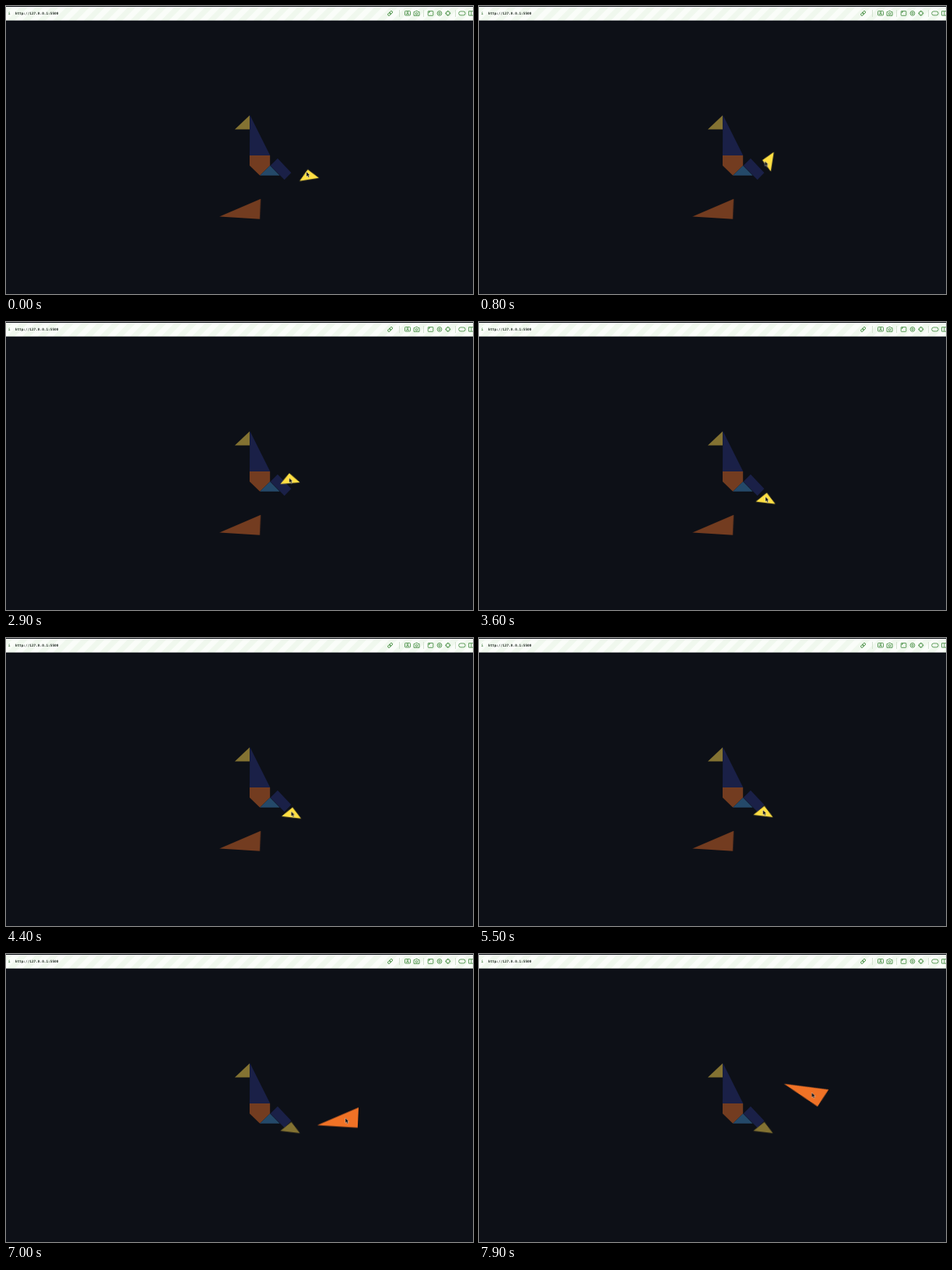
Write an HTML page that moves like this. It is 600 px wide and 370 px high and loops after 8000 ms.

```html
<!DOCTYPE html>
<html lang="en">
<head>
<meta charset="utf-8">
<title>Tangram</title>
<style>
  html, body { margin: 0; width: 100%; height: 100%; overflow: hidden; background: #0d1017; }
  svg { display: block; width: 600px; height: 370px; }
  .navy { fill: #1a2047; }
  .gold { fill: #837232; }
  .rust { fill: #733c20; }
  .blue { fill: #244969; }
  .icons { fill: none; stroke: #4b9148; stroke-width: .9; }
  .url { font: bold 4.4px "DejaVu Sans Mono", monospace; fill: #263029; }

  .tail, .wing, .cursor { animation: 8s linear infinite; }
  .tail { animation-name: tail, tail-fill; }
  .wing { animation-name: wing, wing-fill; }
  .cursor { animation-name: cursor; }

  @keyframes tail {
    0%, 1.25%   { transform: translate(389px, 218.7px) rotate(-9deg); }
    10%         { transform: translate(372.7px, 199.4px) rotate(-81deg); }
    22.5%       { transform: translate(365.5px, 202px) rotate(-86deg); }
    25%, 27.5%  { transform: translate(364.6px, 202.4px) rotate(-86deg); }
    37.5%       { transform: translate(364.7px, 203px) rotate(6.8deg); }
    45%, 50%    { transform: translate(368.7px, 228.1px) rotate(6.8deg); }
    60%, 100%   { transform: translate(365.6px, 224.5px) rotate(6.8deg); }
  }
  @keyframes wing {
    0%, 76.25%  { transform: translate(309.3px, 264px) rotate(0deg); }
    86.25%, 90% { transform: translate(435px, 213.4px) rotate(0deg); }
    94%         { transform: translate(435px, 213.4px) rotate(30.6deg); }
    98.75%, 100% { transform: translate(425.4px, 179px) rotate(30.6deg); }
  }
  /* the piece picked up last is lit */
  @keyframes tail-fill {
    0%, 76.24%    { fill: #ffdf43; }
    76.25%, 100%  { fill: #837232; }
  }
  @keyframes wing-fill {
    0%, 76.24%    { fill: #733c20; }
    76.25%, 100%  { fill: #f07226; }
  }
  @keyframes cursor {
    0%, 1.25%   { transform: translate(386px, 213px); }
    10%         { transform: translate(367.3px, 199.3px); }
    22.5%       { transform: translate(363px, 202px); }
    25%, 27.5%  { transform: translate(362px, 202.3px); }
    37.5%       { transform: translate(364px, 200px); }
    45%, 50%    { transform: translate(368px, 224.5px); }
    60%, 68.75% { transform: translate(364.8px, 220.9px); }
    75%, 76.25% { transform: translate(310.3px, 261.3px); }
    86.25%, 94% { transform: translate(436px, 210.7px); }
    98.75%, 100% { transform: translate(427.5px, 178px); }
  }
</style>
</head>
<body>
<svg viewBox="0 0 600 370">
  <defs>
    <pattern id="stripes" width="14" height="14" patternUnits="userSpaceOnUse" patternTransform="rotate(45)">
      <rect width="14" height="14" fill="#fafdf9"/>
      <rect width="7" height="14" fill="#f0f8ee"/>
    </pattern>
  </defs>
  <rect width="600" height="370" fill="#0d1017"/>

  <rect y="1" width="600" height="17.6" fill="url(#stripes)"/>
  <text class="url" x="2.8" y="11" style="fill:#3c7a3a">i</text>
  <text class="url" x="11.8" y="11">http://127.0.0.1:5500</text>
  <path d="M505.500 5v9M536.500 5v9M577.500 5v9" stroke="#d5e3d2" fill="none"/>
  <g class="icons">
    <g transform="rotate(-45 493.500 9.500)">
      <rect x="490" y="8" width="4.200" height="3" rx="1.500"/>
      <rect x="493" y="8" width="4.200" height="3" rx="1.500"/>
    </g>
    <rect x="512.500" y="6.500" width="7" height="5.500" rx=".8"/>
    <path d="M514 11q2-2.500 4 0" />
    <circle cx="516" cy="8.600" r=".9"/>
    <path d="M524 7.500h1.500l1-1.200h2l1 1.200h1.500v4.800h-7z"/>
    <circle cx="527.500" cy="9.800" r="1.300"/>
    <rect x="542.200" y="6.500" width="6.600" height="5.800" rx=".6"/>
    <path d="M543.500 9v-1.300h1.500"/>
    <circle cx="557" cy="9.400" r="2.900"/>
    <circle cx="557" cy="9.400" r="1.200"/>
    <circle cx="567.800" cy="9.300" r="2.600"/>
    <path d="M567.800 5.800v2M567.800 10.800v2M564.300 9.300h2M569.300 9.300h2"/>
    <path d="M585 6.900h-.8a2.500 2.500 0 0 0 0 5h.8M586.800 6.900h.8a2.500 2.500 0 0 1 0 5h-.8M585 6.900l1.800 0M585 11.900h1.800"/>
    <path d="M601 6.700h-6.400v5.400h6.400M597.800 6.700v5.400"/>
  </g>

  <path class="gold" d="M313 140.500V158.500H294z"/>
  <path class="navy" d="M313.300 140L339.300 192H313z"/>
  <path class="rust" d="M313 192H339.200V205L326.200 217.700L313 205z"/>
  <path class="blue" d="M339.200 205L351.700 217.700H326.200z"/>
  <path class="navy" d="M349 195.700L366.500 214.200L357.700 223.300L339.700 205z"/>
  <path class="tail" d="M-12.600 4.300L12.600 4.300L0 -8.700z"/>
  <path class="wing" d="M-35 6.500L18 -16.300L16.800 9.700z"/>

  <path class="cursor" d="M0 0V6.300L1.500 5L2.500 7.300L3.700 6.800L2.700 4.600H4.600z"
        fill="#0a0a0a" stroke="#fff" stroke-opacity=".75" stroke-width=".5"/>
</svg>
</body>
</html>
```
